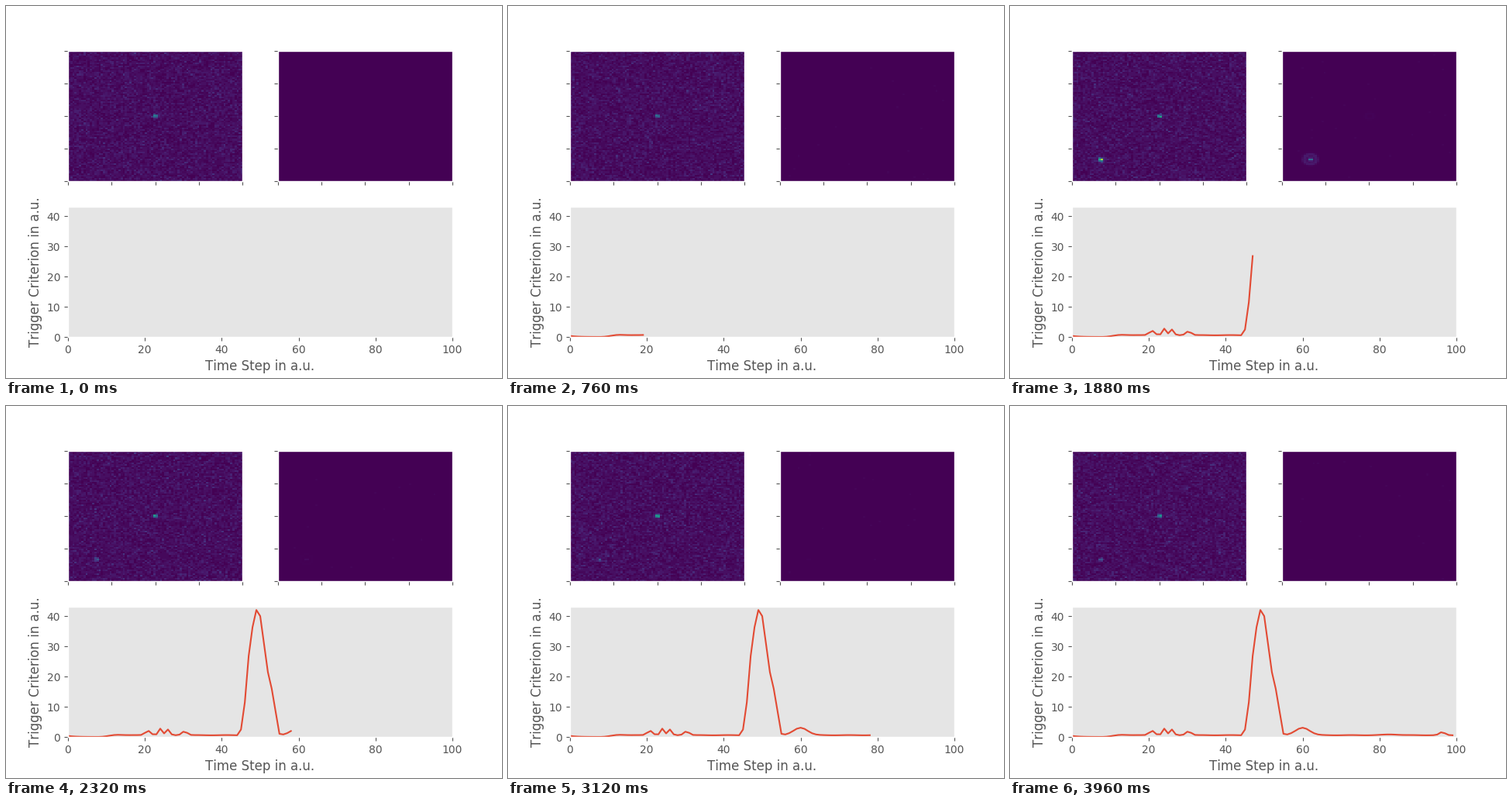
Write a matplotlib script that moves like this. It is 640 px wide and 480 px high and loops after 4 s.

```python
import numpy as np
import matplotlib.pyplot as plt
from matplotlib.animation import FuncAnimation

STEPS = 100
BINS = 80
ONSET = 43
TOP = 43.1
GAIN = 0.02
GREY = "#555555"

plt.rcParams.update({
    "font.family": "DejaVu Sans", "font.size": 10,
    "text.kerning_factor": 6,
    "axes.labelsize": 12, "axes.labelcolor": GREY,
    "axes.facecolor": "#E5E5E5", "axes.edgecolor": "white",
    "axes.linewidth": 1, "axes.axisbelow": True,
    "xtick.color": GREY, "ytick.color": GREY,
})

steps = np.arange(STEPS)


def bump(x, centre, height, width):
    return height * np.exp(-((x - centre) / width) ** 2 / 2)


def criterion(t):
    """Quiet level that fades in, a few small bumps and one tall peak."""
    ramp = np.clip((t - 8) / 5, 0, 1)
    level = 0.05 + 0.58 * ramp ** 2 * (3 - 2 * ramp) + 0.35 * np.exp(-t / 1.8)
    level += 0.04 * ramp * np.sin(0.8 * t)
    for centre, height, width in [(13, 0.15, 1.5), (20.8, 1.5, 0.7),
                                  (24, 2.15, 0.5), (26, 1.85, 0.5),
                                  (30.3, 1.3, 0.7), (60, 2.5, 1.8),
                                  (83, 0.25, 2), (96.3, 1, 0.7)]:
        level += bump(t, centre, height, width)
    peak = np.interp(t, [44, 45, 46, 47, 48, 49, 50, 52, 53, 55],
                     [0, 1.9, 10.9, 26.2, 35.7, 41.4, 39.4, 20.9, 15.4, 0.4])
    return level + peak * (t < 56)


trigger = criterion(steps)
rows, cols = np.mgrid[:BINS, :BINS] + 0.5


def radius(x, y):
    return np.hypot(cols - x, rows - y)


def spot(x, y, width):
    return bump(radius(x, y), 0, 1, width)


def ring(x, y, size):
    return bump(radius(x, y), size, 1, 0.55)


steady = 40 * spot(40, 40, 0.6)
flare = spot(13.1, 13.4, 0.65)
halo = spot(13, 13.4, 1.7)
glow = 0.5 * spot(13, 13.5, 0.5) + 0.065 * ring(13, 13.4, 3) + 0.06 * halo
ghost = ring(40, 40, 1.8)


def camera(i):
    rng = np.random.default_rng(500 + i)
    mean = 1.8 + steady
    if i >= ONSET:
        power = trigger[i] / TOP
        mean = mean + (13 + 33 * power) * flare + 6 * power * halo
    return GAIN * rng.poisson(mean)


def filtered(i):
    rng = np.random.default_rng(900 + i)
    power = trigger[i] / TOP
    image = 0.012 * (rng.random((BINS, BINS)) > 0.997) * (i > 10)
    image = image + 0.02 * power * ghost
    if i >= ONSET:
        image += 1.5 * power * glow
    return image


fig = plt.figure(figsize=(6.4, 4.8), dpi=100, facecolor="white")


def image_axes(place):
    ax = fig.add_subplot(2, 2, place)
    image = ax.imshow(np.zeros((BINS, BINS)), cmap="viridis", vmin=0, vmax=1,
                      origin="lower", extent=(0, BINS, 0, BINS),
                      aspect="auto", interpolation="nearest")
    ticks = np.linspace(0, BINS, 5)
    ax.set_xticks(ticks, [""] * 5)
    ax.set_yticks(ticks, [""] * 5)
    return image


left = image_axes(1)
right = image_axes(2)

ax = fig.add_subplot(2, 1, 2)
ax.set_xlim(0, STEPS)
ax.set_ylim(0, TOP)
ax.set_xlabel("Time Step in a.u.")
ax.set_ylabel("Trigger Criterion in a.u.")
line, = ax.plot([], [], color="#E24A33", lw=1.5)


def update(i):
    left.set_data(camera(i))
    right.set_data(filtered(i))
    line.set_data(steps[:i + 1], trigger[:i + 1])
    return left, right, line


anim = FuncAnimation(fig, update, frames=STEPS, interval=40,
                     repeat=True, repeat_delay=0, blit=False)
plt.show()
```
